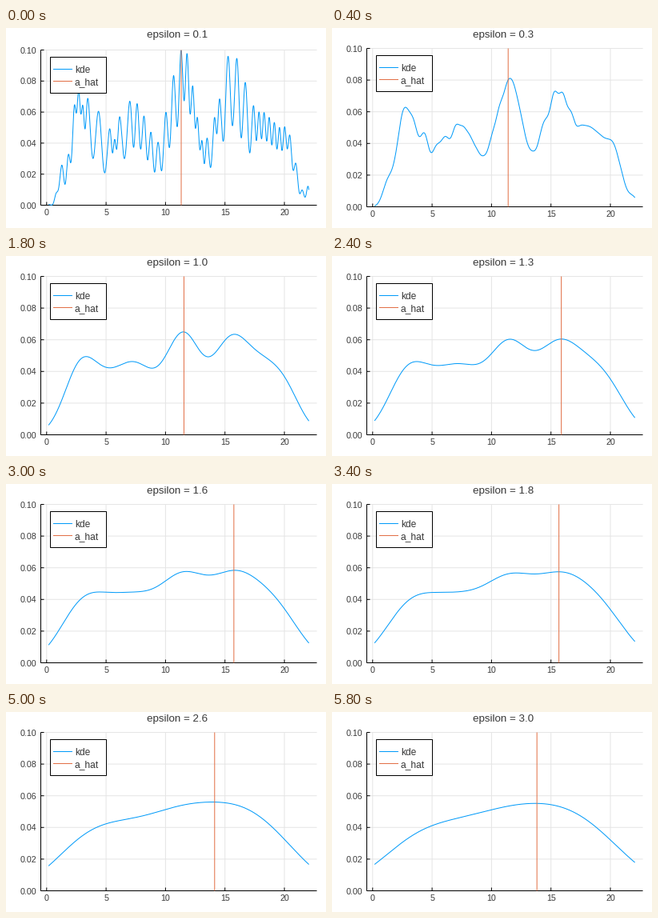
These frames come from a looping animation (400x250 px, 6 s). A matplotlib script:

```python
import numpy as np
import matplotlib.pyplot as plt
from matplotlib.animation import FuncAnimation
from matplotlib.patches import Rectangle

W, H, DPI = 400, 250, 100
FRAMES, STEP = 30, 200
PT = 72 / DPI
BLUE, ORANGE, INK, GRID = "#009AF9", "#E26F46", "#383838", "#e5e5e5"
plt.rcParams.update({"font.family": "Liberation Sans", "path.snap": False})

# Hills and valleys of the density at bandwidth 0.6: x, height in thousandths
HILLS = [(.15, 2.7), (1.5, 24), (2.85, 55.5), (5.1, 39), (7.4, 48.8),
         (9.2, 36.3), (11.55, 73.3), (13.45, 40.8), (15.65, 68.5),
         (17.4, 52.5), (18.4, 49), (20, 39.5), (22.05, 7.5)]

# Clustering of the samples: x, number of clusters passed
CLUSTERS = [(.2, -4), (2.34, 0), (3.4, 3), (5.37, 5), (6.07, 7), (7.03, 8),
            (9.36, 12), (11.32, 15), (12.31, 17), (13.45, 20), (14.16, 21),
            (14.49, 22), (16.01, 24), (17.43, 26), (20.45, 33), (22.05, 36)]

# Bandwidth and position of the highest peak; it jumps after 1.0
PEAKS = [(.1, 11.32), (.6, 11.52), (1.0, 11.55), (1.1, 15.95),
         (1.8, 15.67), (2.2, 14.8), (2.6, 14.13), (3.0, 13.82)]

LO, HI, DX = 0.15, 22.05, 0.02
X = np.arange(-12, 34, DX)
INSIDE = (X > LO - DX / 2) & (X < HI + DX / 2)


def monotone(x, points):
    """Cubic interpolation that is flat at every turning point."""
    px, py = np.array(points, float).T
    h = np.diff(px)
    d = np.diff(py) / h
    a, b = d[:-1], d[1:]
    same = a * b > 0
    m = np.zeros(len(px))
    m[1:-1][same] = 2 * a[same] * b[same] / (a[same] + b[same])
    x = np.clip(x, px[0], px[-1])
    i = np.clip(np.searchsorted(px, x) - 1, 0, len(h) - 1)
    t = (x - px[i]) / h[i]
    return ((1 + 2 * t) * (1 - t) ** 2 * py[i] + t * (1 - t) ** 2 * h[i] * m[i]
            + t * t * (3 - 2 * t) * py[i + 1] + t * t * (t - 1) * h[i] * m[i + 1])


def smooth(y, eps):
    """Gaussian kernel estimate with bandwidth eps."""
    n = int(4 * eps / DX) + 1
    k = np.exp(-0.5 * (np.arange(-n, n + 1) * DX / eps) ** 2)
    return np.convolve(y, k / k.sum(), "same")


def sample_density():
    """Clustered density whose estimate at bandwidth 0.6 shows the hills."""
    hills = monotone(X, HILLS) / 1000
    count = np.interp(X, *zip(*CLUSTERS))
    y = INSIDE * hills * (1 + 0.5 * np.cos(2 * np.pi * count))
    for _ in range(8):
        y = np.maximum(y + INSIDE * (hills - smooth(y, 0.6)), 0)
    return y / (y.sum() * DX)


density = sample_density()
fig = plt.figure(figsize=(W / DPI, H / DPI), dpi=DPI, facecolor="white")
ax = fig.add_axes([0, 0, 1, 1])


def line(x, y, color, z):
    ax.plot(x, y, color=color, lw=PT, zorder=z, solid_capstyle="butt")


def text(x, y, s, size, ha="left"):
    ax.text(x, y, s, fontsize=size * PT, color=INK, ha=ha, va="baseline", zorder=8)


def draw(k):
    ax.cla()
    ax.set(xlim=(0, W), ylim=(H, 0))
    ax.axis("off")
    eps = round(0.1 * (k + 1), 1)

    # the opening layout is slightly shorter than the rest
    top, bottom, box = (27.5, 221.5, 36.5) if k == 0 else (25.5, 223.5, 34.5)
    left, right = 43.5, 388.5
    px = lambda v: 50.8 + 14.86 * v
    py = lambda v: bottom - (bottom - top) * v / 0.1

    for v in range(0, 21, 5):
        x = px(v)
        line([x, x], [top, bottom], GRID, 1)
        line([x, x], [bottom - 4, bottom], "black", 3)
        text(x, bottom + 12.3, str(v), 10.6, "center")
    for v in np.arange(6) * 0.02:
        y = py(v)
        line([left, right], [y, y], GRID, 1)
        line([left, left + 4], [y, y], "black", 3)
        text(38.3, y + 4, f"{v:.2f}", 10.6, "right")
    line([left, left], [top, bottom], "black", 3)
    line([left, right], [bottom, bottom], "black", 3)

    curve = np.minimum(smooth(density, eps), 0.1)
    line(px(X[INSIDE]), py(curve[INSIDE]), BLUE, 4)
    peak = px(np.interp(eps, *zip(*PEAKS)))
    line([peak, peak], [top, bottom], ORANGE, 5)

    ax.add_patch(Rectangle((55.5, box), 70, 45, fc="white", ec="black",
                           lw=PT, zorder=6))
    for j, (name, color) in enumerate([("kde", BLUE), ("a_hat", ORANGE)]):
        y = box + 15 * (j + 1)
        line([59, 83], [y, y], color, 7)
        text(86, y + 4.5, name, 12)

    text(214.3, 12, f"epsilon = {eps:.1f}", 13.4, "center")
    return []


anim = FuncAnimation(fig, draw, frames=FRAMES, interval=STEP, repeat=True,
                     repeat_delay=0, blit=False)
plt.show()
```
